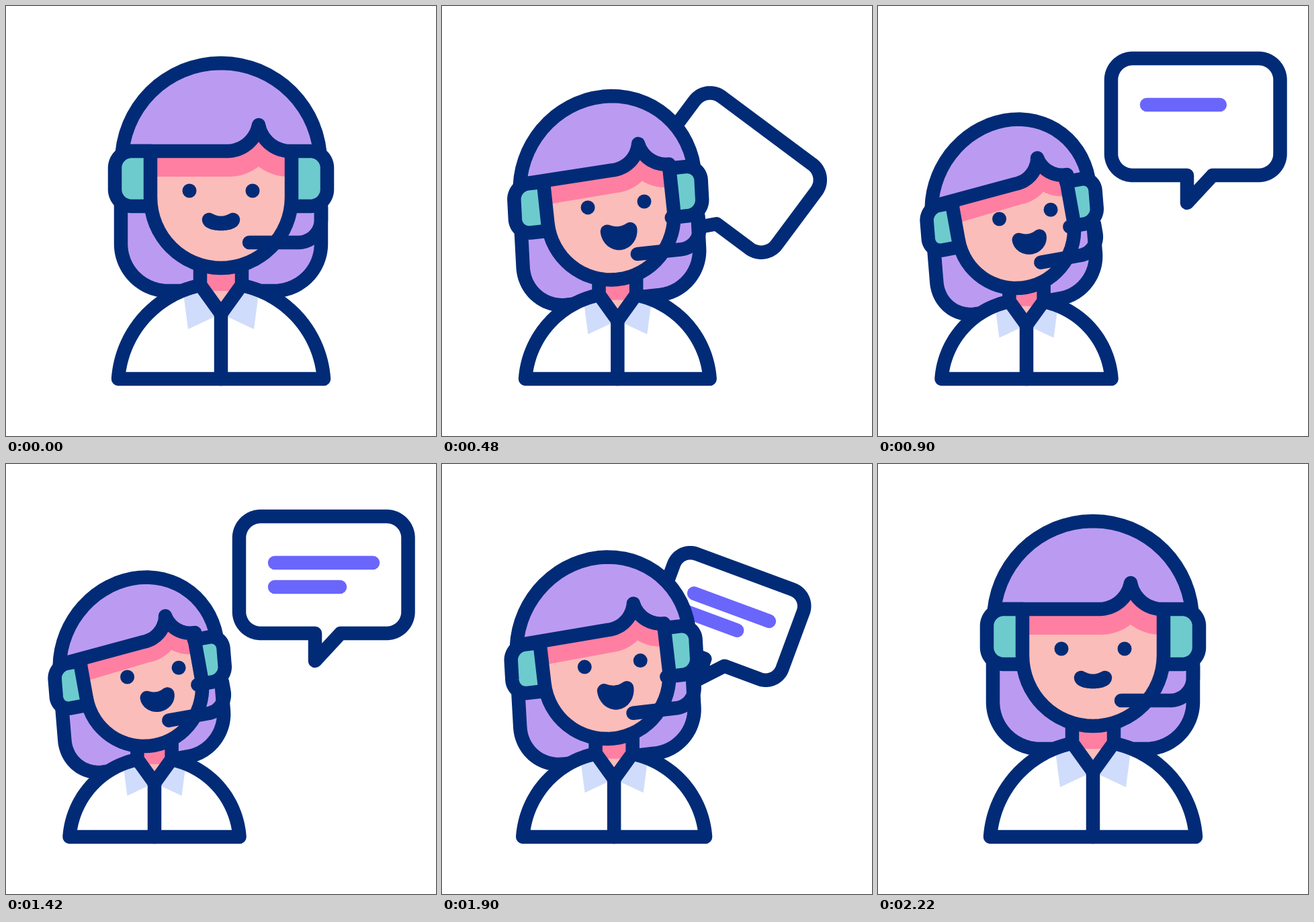
These frames come from a looping animation (640 by 640 pixels, 2400 ms). An HTML page with a canvas:

```html
<!DOCTYPE html>
<html lang="en">
<head>
<meta charset="utf-8">
<title>Support agent</title>
<style>
  html, body { margin: 0; width: 100%; height: 100%; overflow: hidden; background: #fff; }
  canvas { display: block; }
</style>
</head>
<body>
<canvas id="stage" width="640" height="640"></canvas>
<script>
const ctx = document.getElementById('stage').getContext('2d');
const LOOP = 2400, MID = 320;
const NAVY = '#022b77', HAIR = '#bb9bf1', SKIN = '#fbbdb9', BLUSH = '#ff7fa2',
      TEAL = '#6dcbce', COLLAR = '#d0dcfb', TEXT = '#6a66fb', WHITE = '#fff';

const mix = (a, b, k) => a + (b - a) * k;
const clamp = v => Math.min(1, Math.max(0, v));
const ramp = (t, from, to) => {
  const k = clamp((t - from) / (to - from));
  return k * k * (3 - 2 * k);
};

// Points of a circular arc; angles are in quarter turns, clockwise from the right.
function arc(cx, cy, r, from, to) {
  return Array.from({ length: 33 }, (_, i) => {
    const a = mix(from, to, i / 32) * Math.PI / 2;
    return [cx + r * Math.cos(a), cy + r * Math.sin(a)];
  });
}

// A level line that rises to a peak between two arcs.
function wave(x, y, r, q) {
  const gap = r * Math.cos(q * Math.PI / 2);
  return [[x, y], ...arc(376 - gap, y - r, r, 1, q), ...arc(376 + gap, y - r, r, 2 - q, 1)];
}

// Points are mapped before drawing, so line weight never scales.
function draw(points, map, fill, stroke, close) {
  ctx.beginPath();
  for (const p of points) ctx.lineTo(...map(...p));
  if (close) ctx.closePath();
  if (fill) { ctx.fillStyle = fill; ctx.fill(); }
  if (stroke) { ctx.strokeStyle = stroke; ctx.stroke(); }
}

// Rotate and scale around (px, py), which lands on (x, y).
function turn(px, py, x, y, s, deg) {
  const a = deg * Math.PI / 180, c = Math.cos(a) * s, n = Math.sin(a) * s;
  return (u, v) => [x + (u - px) * c - (v - py) * n, y + (u - px) * n + (v - py) * c];
}

const BUBBLE = [
  ...arc(379, 110, 32, 2, 3), ...arc(566.5, 110, 32, 3, 4), ...arc(566.5, 220, 32, 0, 1),
  [498, 252], [460, 293], [460, 252], ...arc(379, 220, 32, 1, 2)
];
const DOME = arc(MID, 233, 148, 2, 4);
const FRINGE = wave(180, 216, 48, .12);
const SHADE = wave(215, 254, 72, .58);
const LOWER_HAIR = [[171, 285], ...arc(241, 354, 70, 2, 1), ...arc(399, 354, 70, 1, 0), [469, 285]];
const FACE = [[215, 216], ...arc(MID, 285, 105, 2, 0), [425, 216]];
const MIC = [[469, 300], ...arc(435, 318, 34, 0, 1), [362, 352]];
const NECK = [[289, 385], [289, 415], [MID, 458], [351, 415], [351, 385]];
const EAR = [[105, 216], ...arc(133, 241, 25, 3, 4), ...arc(133, 273, 25, 0, 1), [105, 298]];
const FLAP = [[56, 428], [49, 481], [0, 458], [31, 415]];
const shoulders = (from, to) => arc(MID, 566, 153.4, from, to);

// Draw a half shape on both sides of the middle.
function pair(half, map, fill, stroke) {
  for (const m of [-1, 1]) draw(half, (x, y) => map(MID + m * x, y), fill, stroke);
}

function drawBubble(t) {
  const rise = ramp(t, 200, 700), windup = ramp(t, 1450, 1700), tuck = ramp(t, 1700, 2200);
  const pose = (hidden, shown, wound) =>
    mix(mix(mix(hidden, shown, rise), wound, windup), hidden, tuck);
  const map = turn(330, 199, pose(295.5, 330, 313), pose(191.6, 199, 224),
                   pose(.75, 1, .853), pose(90, 0, -18));
  draw(BUBBLE, map, WHITE, NAVY, true);
  for (const i of [0, 1]) {
    const start = 700 + 300 * i, y = 147 + 36 * i;
    const grown = ramp(t, start, start + 300);
    if (grown) draw([[400, y], [400 + (146 - 49 * i) * grown, y]], map, null, TEXT);
  }
}

function drawBody(map) {
  draw(shoulders(2.046, 3.954), map, WHITE);
  pair(FLAP, map, COLLAR);
  draw(NECK, map, SKIN);
  draw([[289, 385], [351, 385], [351, 424], [289, 424]], map, BLUSH);
  draw([...shoulders(2.87, 2.046), ...shoulders(3.954, 3.13)], map, null, NAVY);
  draw(NECK, map, null, NAVY);
  draw([[MID, 458], [MID, 555]], map, null, NAVY);
}

function drawMouth(map, open) {
  const w = mix(18, 20, open), depth = mix(6, 32, open), lips = [];
  for (let a = 0; a < 2; a += 1 / 16) {
    const c = Math.cos(a * Math.PI), s = Math.sin(a * Math.PI);
    lips.push([MID - w * c, 318 + (s > 0 ? depth * s : 5 * s * s)]);
  }
  draw(lips, map, null, NAVY, true);
}

function drawHead(head, skull, shift, open) {
  const brow = (x, y) => shift(4, -11 * clamp((x - 215) / 113))(x, y);
  const face = shift(2, 0), look = shift(17, -15);
  const asIs = (x, y) => [x, y];
  const place = (points, map) => points.map(p => map(...p));
  const fringe = place(FRINGE, brow);

  draw(FACE, face, SKIN);
  draw([...fringe, ...place([...SHADE, [425, 254]], brow).reverse()], asIs, BLUSH);
  draw([...place(DOME, skull), ...fringe.slice().reverse()], asIs, HAIR);
  draw(DOME, skull, null, NAVY);
  draw(fringe, asIs, null, NAVY);
  pair(EAR, skull, TEAL, NAVY);
  draw(FACE, face, null, NAVY);
  draw(MIC, shift(-5, 0), null, NAVY);

  ctx.fillStyle = NAVY;
  for (const side of [-47, 47]) {
    ctx.beginPath();
    ctx.arc(...look(MID + side, 275), 10.5, 0, 7);
    ctx.fill();
  }
  drawMouth(look, open);
}

function frame() {
  const t = performance.now() % LOOP;
  const p = ramp(t, 200, 700) - ramp(t, 1700, 2200);
  const talk = t > 700 && t < 1700 ? Math.sin(Math.PI * (t - 700) / 500) ** 2 : 0;
  const s = mix(1, .827, p), x = mix(MID, 221, p);

  const head = turn(MID, 406, x, 555 - 149 * s, s, -10.2 * p);
  const shift = (dx, dy) => (u, v) => {
    const [a, b] = head(u, v);
    return [a + dx * p, b + dy * p];
  };
  // The hair leans and narrows a little as the head turns.
  const skull = (u, v) => shift(.08 * (257 - v) - .02 * (u - MID), 0)(u, v);

  ctx.fillStyle = WHITE;
  ctx.fillRect(0, 0, 640, 640);
  ctx.lineWidth = 20.5;
  ctx.lineCap = ctx.lineJoin = 'round';
  drawBubble(t);
  draw(LOWER_HAIR, skull, HAIR, NAVY);
  drawBody(turn(MID, 555, x, 555, s, 0));
  drawHead(head, skull, shift, p * (1 - .62 * talk));
  requestAnimationFrame(frame);
}
frame();
</script>
</body>
</html>
```
